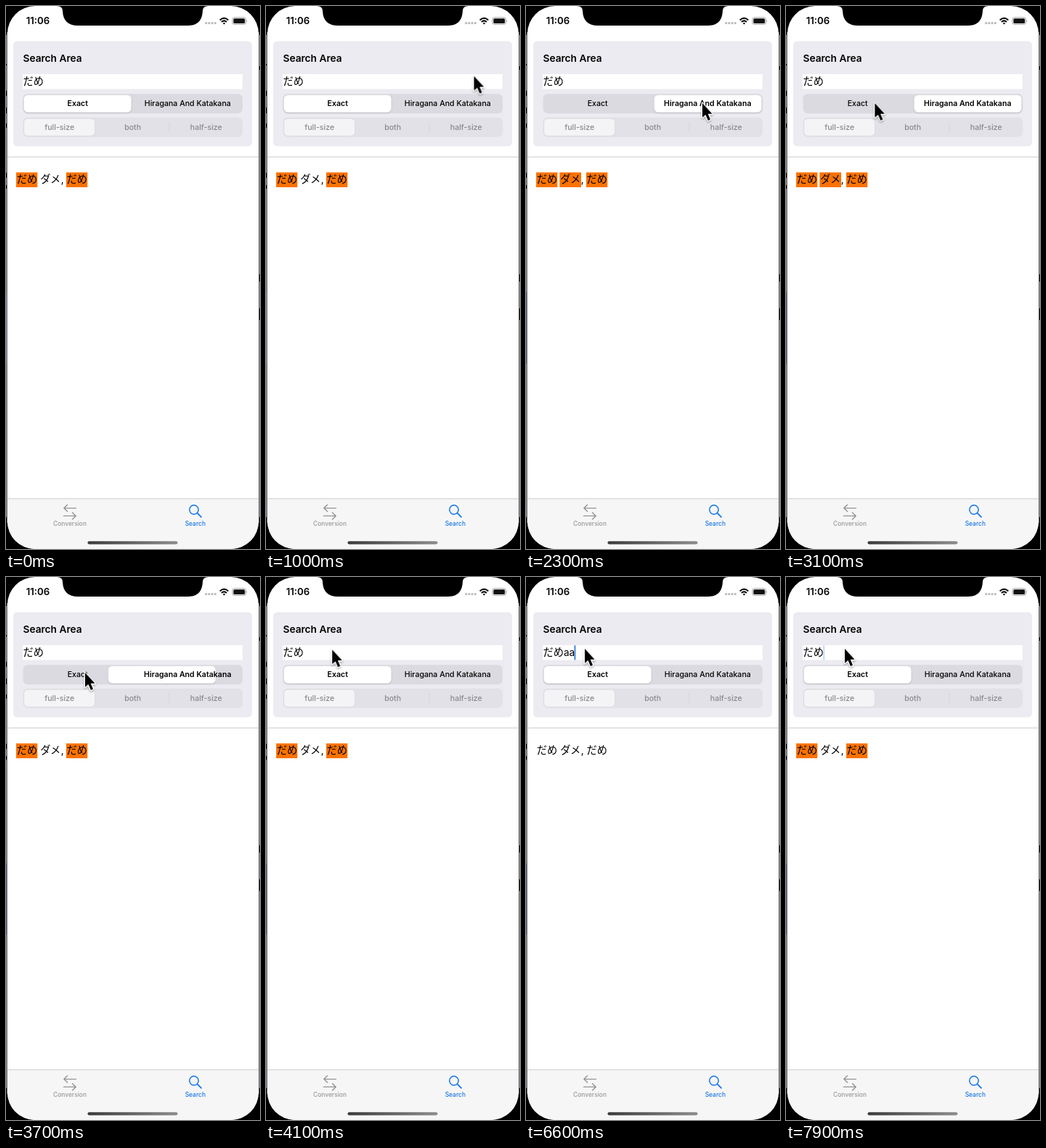
These frames come from a looping animation (350 by 749 pixels, 8 s). An HTML page:

```html
<!DOCTYPE html>
<html lang="ja">
<head>
<meta charset="utf-8">
<title>Search</title>
<style>
html, body { margin: 0; width: 100%; height: 100%; overflow: hidden; background: #000; }
svg { display: block; width: 100vw; height: 100vh; }
text { font-family: Inter, sans-serif; font-weight: 500; font-size: 10.6px; }
.mid { text-anchor: middle; }
.bold { font-weight: 600; }
.off { fill: #89888d; }
.tab { font-size: 8.45px; text-anchor: middle; }
.ja { font: 400 14.25px "Noto Sans CJK JP", "Noto Sans CJK", sans-serif; }
.latin { font: 400 13.6px Inter, sans-serif; }

/* One loop is 8 s, so 1.25% is 100 ms. */
.anim { animation: 8s linear infinite; }
.step { animation-timing-function: step-end; }
#cursor { animation-name: cursor; }
#thumb { animation-name: thumb; }
.hit { animation-name: hit; }
.kana { animation-name: kana; }
.pick-left { animation-name: pickLeft; }
.pick-right { animation-name: pickRight; }
#first { animation-name: first; }
#second { animation-name: second; }
#caret { animation-name: caretMove; }
#caret rect { animation-name: blink; }
#desk { animation-name: desk; }

@keyframes cursor {
  0%, 7.5% { transform: translate(358px, 23px); animation-timing-function: ease-out; }
  18.75% { transform: translate(242px, 138px); }
  21.25%, 30% { transform: translate(242px, 132px); animation-timing-function: ease-in-out; }
  41.25% { transform: translate(108px, 132px); }
  43.75%, 48.75% { transform: translate(108px, 130px); animation-timing-function: ease-in-out; }
  52.5% { transform: translate(85px, 89px); animation-timing-function: ease-out; }
  56.25%, 100% { transform: translate(80px, 97px); }
}
@keyframes thumb {
  0%, 22.25% { transform: none; animation-timing-function: ease-in-out; }
  27.875%, 44.375% { transform: translateX(152px); animation-timing-function: ease-in-out; }
  50%, 100% { transform: none; }
}
@keyframes kana { 0% { opacity: 0; } 22.25% { opacity: 1; } 44.375%, 100% { opacity: 0; } }
@keyframes hit { 0% { opacity: 1; } 68.5% { opacity: 0; } 91%, 100% { opacity: 1; } }
@keyframes pickLeft { 0% { opacity: 1; } 24.75% { opacity: 0; } 47.25%, 100% { opacity: 1; } }
@keyframes pickRight { 0% { opacity: 0; } 24.75% { opacity: 1; } 47.25%, 100% { opacity: 0; } }
@keyframes first { 0% { opacity: 0; } 68.5% { opacity: 1; } 91%, 100% { opacity: 0; } }
@keyframes second { 0% { opacity: 0; } 82.25% { opacity: 1; } 86%, 100% { opacity: 0; } }
@keyframes caretMove {
  0% { transform: none; }
  68.5% { transform: translateX(7.6px); }
  82.25% { transform: translateX(15.2px); }
  86% { transform: translateX(7.6px); }
  91%, 100% { transform: none; }
}
@keyframes blink {
  0% { opacity: 0; }
  61% { opacity: .5; }
  62.25% { opacity: 1; }
  73.5% { opacity: .5; }
  74.75% { opacity: 0; }
  77.25% { opacity: .5; }
  78.5% { opacity: 1; }
  97.25% { opacity: .6; }
  98.5%, 100% { opacity: .3; }
}
@keyframes desk { 0% { fill: #8d9ab0; } 19.75%, 100% { fill: #56657c; } }
</style>
</head>
<body>
<svg viewBox="0 0 350 749" preserveAspectRatio="none">
  <defs>
    <filter id="soft" x="-20%" y="-30%" width="140%" height="180%">
      <feDropShadow dx="0" dy="1" stdDeviation="1.2" flood-opacity=".16"/>
    </filter>
    <filter id="drop" x="-50%" y="-30%" width="220%" height="180%">
      <feDropShadow dx="0" dy="1.5" stdDeviation="1.4" flood-opacity=".4"/>
    </filter>
    <linearGradient id="bar">
      <stop stop-color="#3a3a3a"/><stop offset="1" stop-color="#8c8c8c"/>
    </linearGradient>
  </defs>

  <!-- desktop and bezel -->
  <rect width="350" height="749"/>
  <path d="M0 40h1v665h-1z M349 40h1v665h-1z" fill="#8a8a8d"/>
  <path d="M1 36h1v677h-1z M348 36h1v677h-1z" fill="#77777a"/>
  <rect id="desk" class="anim step" y="395" width="1" height="98"/>
  <path d="M0 80h1v2h-1z M0 117h1v7h-1z M0 140h1v8h-1z M0 162h1v6h-1z M0 230h1v7h-1z M0 247h1v5h-1z M349 83h1v5h-1z M349 370h1v10h-1z M349 417h1v16h-1z"/>
  <rect x="2" width="346" height="749" rx="38" fill="#fff"/>

  <!-- status bar -->
  <path d="M70 0Q78 0 78 7Q79 27 99 27H251Q270 27 271 7Q271 0 279 0Z"/>
  <text x="27.7" y="25.3" class="bold" style="font-size:13.2px">11:06</text>
  <g fill="#b9b9bb">
    <circle cx="275.7" cy="23.6" r="1.6"/><circle cx="279.9" cy="23.6" r="1.6"/>
    <circle cx="284.1" cy="23.6" r="1.6"/><circle cx="288.3" cy="23.6" r="1.6"/>
  </g>
  <g fill="none" stroke="#000" stroke-width="2">
    <path d="M294.7 19.4Q300.5 14 306.3 19.4M297 22Q300.5 18.8 304 22"/>
    <path d="M298.8 23.7Q300.5 22.3 302.2 23.7L300.5 25.5Z" fill="#000" stroke="none"/>
  </g>
  <rect x="312" y="15.8" width="18.6" height="9.6" rx="2.8" fill="none" stroke="#999" stroke-width=".9"/>
  <rect x="313.4" y="17.2" width="15.8" height="6.8" rx="1.6" fill="#111"/>
  <path d="M331.6 19Q333 20.6 331.6 22.2Z" fill="#999"/>

  <!-- search card -->
  <rect x="10" y="48.5" width="329" height="145" rx="5.5" fill="#ecebf1"/>
  <text x="23.5" y="76.7" class="bold" style="font-size:13.7px">Search Area</text>
  <rect x="23" y="94" width="303" height="20.5" fill="#fff"/>
  <text x="23.6" y="109.2" class="ja">だめ</text>
  <text id="first" x="52" y="109" class="latin anim step">a</text>
  <text id="second" x="59.6" y="109" class="latin anim step">a</text>
  <g id="caret" class="anim step"><rect class="anim step" x="51.4" y="94.3" width="1.7" height="20" fill="#2272d2"/></g>

  <rect x="23.5" y="121.2" width="302.5" height="27" rx="6.5" fill="#dbdae0"/>
  <rect id="thumb" class="anim" x="24.6" y="122.7" width="148" height="24" rx="5.5" fill="#fff" stroke="#000" stroke-opacity=".06" stroke-width=".6" filter="url(#soft)"/>
  <g class="mid">
    <text x="98.7" y="138.4" class="bold anim step pick-left">Exact</text>
    <text x="98.7" y="138.4" class="anim step pick-right">Exact</text>
    <text x="250.3" y="138.4" class="anim step pick-left">Hiragana And Katakana</text>
    <text x="250.3" y="138.4" class="bold anim step pick-right">Hiragana And Katakana</text>
  </g>

  <rect x="23.5" y="153.7" width="302.5" height="27" rx="6.5" fill="#e2e1e7"/>
  <rect x="24.6" y="155.2" width="98" height="24" rx="5.5" fill="#f4f4f6" stroke="#d6d5da" stroke-width=".7"/>
  <path d="M225 160.5v13.5" stroke="#d5d4da"/>
  <g class="mid">
    <text x="73.7" y="171" class="off">full-size</text>
    <text x="174.6" y="171" class="off">both</text>
    <text x="275.8" y="171" class="off">half-size</text>
  </g>
  <path d="M2 208.3H348" stroke="#dcdcde" stroke-width="1.4"/>

  <!-- result -->
  <g fill="#fb7200">
    <path class="anim step hit" d="M14 229.5h29.3v20.5h-29.3z M83 229.5h29.3v20.5h-29.3z"/>
    <rect class="anim step kana" x="46.3" y="229.5" width="29.7" height="20.5"/>
  </g>
  <text x="14.7" y="244.2" class="ja">だめ</text>
  <text x="47.3" y="244.2" class="ja">ダメ</text>
  <text x="75.8" y="244" class="latin">,</text>
  <text x="83.6" y="244.2" class="ja">だめ</text>

  <!-- tab bar -->
  <path d="M2 679.5H348V711A38 38 0 0 1 310 749H40A38 38 0 0 1 2 711Z" fill="#f6f6f6"/>
  <path d="M2 679.7H348" stroke="#cbcbcd" stroke-width=".9"/>
  <g fill="none" stroke-width="1.4" stroke-linecap="round" stroke-linejoin="round">
    <path d="M96.5 692.6H79.8L84.6 688M79.8 692.6L84.6 697.2M79.5 703.4H96.3L91.5 698.8M96.3 703.4L91.5 708" stroke="#949496"/>
    <path d="M263.6 699.4L269 704.8" stroke="#1676e6" stroke-width="1.8"/>
    <circle cx="259" cy="694.8" r="6.2" stroke="#1676e6" stroke-width="1.5"/>
  </g>
  <text x="88" y="717.2" class="tab" fill="#98989a">Conversion</text>
  <text x="260.8" y="717.2" class="tab" fill="#1676e6">Search</text>
  <rect x="112.5" y="738.2" width="124" height="4.2" rx="2.1" fill="url(#bar)"/>

  <g id="cursor" class="anim">
    <path transform="translate(1 2) scale(.86)" d="M0 0V23L5.2 18.5L9.2 27.8L12.8 26.2L8.9 17.2H15.8Z" stroke="#fff" stroke-width="3" stroke-linejoin="round" paint-order="stroke" filter="url(#drop)"/>
  </g>
</svg>
</body>
</html>
```
